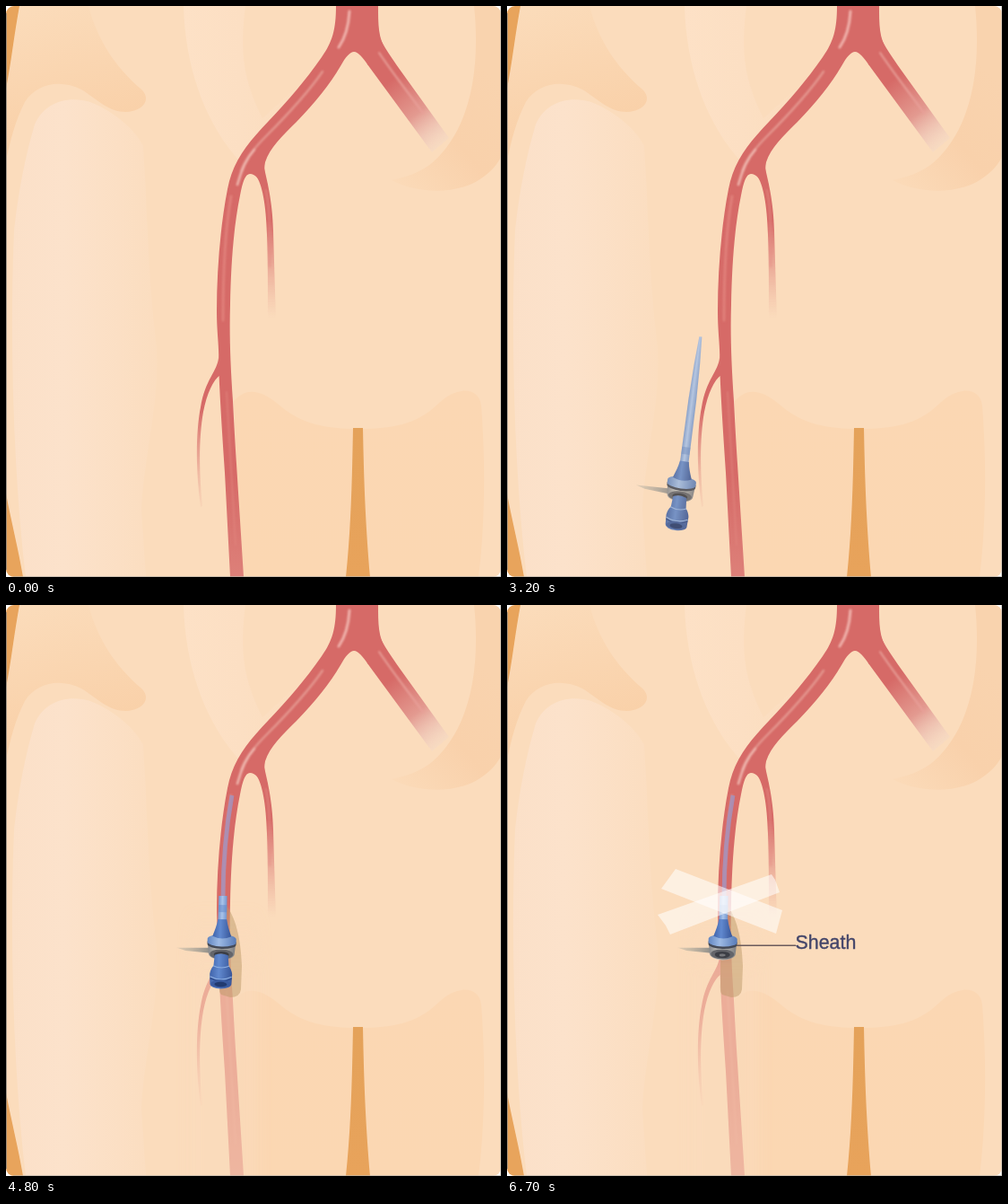
An HTML page that plays this animation: 552 by 636 pixels, repeating every 6.8 s.

```html
<!DOCTYPE html>
<html lang="en">
<head>
<meta charset="utf-8">
<title>Sheath insertion</title>
<style>
  html, body { margin: 0; width: 100%; height: 100%; overflow: hidden; background: #fff; }
  svg { display: block; width: 552px; height: 636px; }
  text { font: 21.4px "Liberation Sans", Arial, sans-serif; fill: #44466a; stroke: #44466a; stroke-width: .4; }
</style>
</head>
<body>
<svg viewBox="0 0 552 636" xmlns="http://www.w3.org/2000/svg">
  <defs>
    <clipPath id="card"><rect width="552" height="636" rx="9"/></clipPath>
    <clipPath id="outside"><rect y="324" width="552" height="312"/></clipPath>

    <linearGradient id="hip" x1="0" y1="0" x2=".25" y2="1">
      <stop offset="0" stop-color="#fbdcbb"/><stop offset="1" stop-color="#f9cfa6"/>
    </linearGradient>
    <linearGradient id="thigh">
      <stop offset="0" stop-color="#fbe0c8"/><stop offset=".35" stop-color="#fce2cb"/>
      <stop offset="1" stop-color="#fbddbf"/>
    </linearGradient>
    <linearGradient id="belly" gradientUnits="userSpaceOnUse" x1="198" y1="0" x2="340" y2="0">
      <stop offset="0" stop-color="#fde1c6"/><stop offset=".45" stop-color="#fcdfc3"/>
      <stop offset="1" stop-color="#fbdcbc"/>
    </linearGradient>
    <linearGradient id="flank" gradientUnits="userSpaceOnUse" x1="435" y1="195" x2="552" y2="90">
      <stop offset="0" stop-color="#fbdab8"/><stop offset=".5" stop-color="#f9d1ab"/>
      <stop offset="1" stop-color="#f9d3ae"/>
    </linearGradient>
    <linearGradient id="legs" x2="0" y2="1">
      <stop offset="0" stop-color="#fbd7b3"/><stop offset="1" stop-color="#fbd7b2"/>
    </linearGradient>
    <linearGradient id="gap" x2="0" y2="1">
      <stop offset="0" stop-color="#e4a25a"/><stop offset="1" stop-color="#e8a35b"/>
    </linearGradient>

    <linearGradient id="armFade" gradientUnits="userSpaceOnUse" x1="428" y1="84" x2="486" y2="158">
      <stop offset="0" stop-color="#d66a67"/><stop offset=".5" stop-color="#e39a90"/>
      <stop offset="1" stop-color="#f0dad0" stop-opacity=".25"/>
    </linearGradient>
    <linearGradient id="innerFade" gradientUnits="userSpaceOnUse" x1="0" y1="240" x2="0" y2="348">
      <stop offset="0" stop-color="#d66a67"/><stop offset="1" stop-color="#e59a8c" stop-opacity="0"/>
    </linearGradient>
    <linearGradient id="sideFade" gradientUnits="userSpaceOnUse" x1="0" y1="450" x2="0" y2="558">
      <stop offset="0" stop-color="#d66a67"/><stop offset="1" stop-color="#e59a8c" stop-opacity=".1"/>
    </linearGradient>
    <linearGradient id="trunk" x2="0" y2="1">
      <stop offset="0" stop-color="#d66a67"/><stop offset=".82" stop-color="#d66a67"/>
      <stop offset="1" stop-color="#dd8079"/>
    </linearGradient>
    <linearGradient id="veil" gradientUnits="userSpaceOnUse" x1="0" y1="338" x2="0" y2="405">
      <stop offset="0" stop-color="#fbdabb" stop-opacity="0"/><stop offset="1" stop-color="#fbdabb"/>
    </linearGradient>

    <linearGradient id="tube">
      <stop offset="0" stop-color="#7496cf"/><stop offset=".45" stop-color="#a9c3ea"/>
      <stop offset="1" stop-color="#7495cd"/>
    </linearGradient>
    <linearGradient id="blue">
      <stop offset="0" stop-color="#4063aa"/><stop offset=".4" stop-color="#6189cf"/>
      <stop offset="1" stop-color="#375598"/>
    </linearGradient>
    <linearGradient id="rim">
      <stop offset="0" stop-color="#6387c2"/><stop offset=".4" stop-color="#9dbae4"/>
      <stop offset="1" stop-color="#587bb8"/>
    </linearGradient>
    <linearGradient id="steel">
      <stop offset="0" stop-color="#85868a"/><stop offset=".4" stop-color="#c9c8c0"/>
      <stop offset="1" stop-color="#7c7d80"/>
    </linearGradient>
    <linearGradient id="pin">
      <stop offset="0" stop-color="#c4bba8" stop-opacity=".5"/><stop offset="1" stop-color="#8f8d88"/>
    </linearGradient>
    <filter id="soft" x="-30%" width="160%"><feGaussianBlur stdDeviation="7"/></filter>
    <filter id="haze"><feGaussianBlur stdDeviation=".9"/></filter>
    <filter id="blend"><feGaussianBlur stdDeviation=".6"/></filter>
  </defs>

  <g clip-path="url(#card)">
    <rect width="552" height="636" fill="#fbdcbc"/>

    <!-- body -->
    <path fill="url(#hip)" d="M14 0H92C102 38 122 68 150 92C163 103 154 117 134 118C114 118 102 104 84 93
      C62 82 35 85 21 107C10 128 5 150 0 172V90Z"/>
    <path fill="url(#thigh)" d="M9 250C14 205 22 165 32 132C42 108 68 99 94 107C122 118 146 140 153 156
      C158 230 158 300 168 380C172 440 154 500 151 560L156 636H22C8 520 4 370 9 250Z"/>
    <path fill="url(#belly)" d="M198 0C200 75 226 145 278 190L340 90V0Z"/>
    <path fill="#fbdcbc" d="M267 0C260 55 266 85 286 125L345 70V0Z"/>
    <path fill="url(#flank)" d="M522 0C530 80 514 140 476 174C462 186 444 191 430 194
      C460 210 505 210 530 192C542 184 548 176 552 168V0Z"/>
    <path fill="url(#legs)" d="M254 440C268 424 285 428 303 443C328 466 358 471 393 471C430 471 459 466 482 443
      C501 424 527 423 530 445C535 510 534 580 527 636H262Z"/>
    <path fill="url(#gap)" d="M387 470H398C399 520 400 565 406 636H379C385 580 386 520 387 470Z"/>
    <path fill="#e8a45c" d="M0 0H15C9 32 6 62 0 92ZM0 543C6 575 14 606 19 636H0Z"/>

    <!-- vessels -->
    <g filter="url(#blend)">
      <path fill="url(#armFade)" d="M413 24C417 40 427 53 440 72L494 147L475 163L403 65L396 48Z"/>
      <path fill="url(#innerFade)" d="M287 176C291 195 297 215 298 250C299 285 300 315 301 348H292
        C292 310 292 280 291 255C290 222 286 198 278 188Z"/>
      <path fill="url(#sideFade)" d="M237 392C236 406 222 416 217 447C212 472 211 515 217 558L219 557
        C215 520 215 480 220 452C224 432 231 416 239 411Z"/>
      <path fill="url(#trunk)" d="M368 0C368 26 364 40 352 57C334 83 314 106 293 128C267 155 253 174 247 204
        C239 245 235 295 235 340C235 365 238 380 237 395C238 430 241 475 244 520L250 636H265
        C261 570 256 500 253 440C250 395 249 365 250 332C251 285 254 245 261 211C264 195 267 187 272 187
        C278 187 284 194 288 204L292 200C289 192 287 184 289 174C294 158 308 145 324 129
        C344 108 361 88 373 67C379 56 384 51 388 51C393 51 398 58 404 66L424 50C415 36 415 20 415 0Z"/>
    </g>
    <g fill="none" stroke-linecap="round" filter="url(#haze)">
      <path stroke="#f0b4ad" stroke-width="3" d="M383 6C382 24 378 36 371 46"/>
      <path stroke="#e59a92" stroke-width="2.2" d="M353 73C335 99 308 127 290 145C275 160 266 172 262 184"/>
      <path stroke="#f0bbb2" stroke-width="2.5" d="M277 160C267 171 262 184 258 199"/>
      <path stroke="#e0807a" stroke-width="3" d="M251 212C244 250 242 300 242 350"/>
      <path stroke="#e8a099" stroke-width="2" d="M416 52C432 76 446 93 465 119"/>
      <path stroke="#e2857f" stroke-width="2" opacity=".6" d="M246 430L256 600"/>
      <path stroke="#e58d86" stroke-width="2" opacity=".6" d="M290 205C294 225 294 250 294 290"/>
    </g>

    <path id="cover" filter="url(#soft)" fill="url(#veil)" d="M205 330H282V660H205Z"/>
    <path id="shadow" fill="#bd9a68" d="M245 334C256 347 262 372 263 402L262 428Q261 437 250 437L240 434
      Q237 432 238 420V375Z"/>
    <path id="inside" pathLength="1" fill="none" stroke="#9f95c3" stroke-width="4.8"
      d="M242 326C242 288 246 245 252 212"/>

    <!-- sheath and dilator -->
    <g id="device" filter="url(#blend)">
      <g clip-path="url(#outside)"><g class="pose">
        <path fill="url(#tube)" d="M-1.5 -170H1.5L3.2 -140L4.4 -100L4.8 -26H-4.8L-4.4 -100L-3.2 -140Z"/>
        <path fill="#5f86c8" opacity=".5" d="M-4.6 -46H4.6V-38H-4.6Z"/>
      </g></g>
      <g class="pose">
        <path fill="url(#pin)" d="M-50 3L-12 2V8L-40 6Z"/>
        <path fill="url(#steel)" d="M-15.5 -3H15.5L14.5 8A14.5 7.5 0 0 1 -14.5 8Z"/>
        <ellipse cy="9" rx="13" ry="5.5" fill="#64656a"/>
        <ellipse cy="9.5" rx="8.5" ry="3.6" fill="#3c3e45"/>
        <ellipse cy="10" rx="3.5" ry="1.5" fill="#75767a"/>
        <path fill="#454a56" d="M-16 -5H16V-2A16 5 0 0 1 -16 -2Z"/>
        <path fill="url(#rim)" d="M-16 -8A16 5 0 0 1 16 -8V-4.5A16 5 0 0 1 -16 -4.5Z"/>
        <path fill="url(#blue)" d="M-5 -30H5C6 -23 8 -18 10.5 -11Q0 -6 -10.5 -11C-8 -18 -6 -23 -5 -30Z"/>
      </g>
      <g class="pose"><g id="cap">
        <path fill="url(#blue)" d="M-7.5 10Q0 7 7.5 10L8.5 22Q11.5 25 12.5 31L12 42A12 5.5 0 0 1 -12 42
          L-12.5 31Q-11.5 25 -8.5 22Z"/>
        <path fill="none" stroke="#8fb0e2" stroke-width="1.1" d="M-9 22Q0 26 9 22M-12 34Q0 40 12 34"/>
        <path fill="none" stroke="#2f4c8c" stroke-width="1.3" d="M-12 36Q0 42 12 36"/>
        <ellipse cy="42" rx="11" ry="4.6" fill="#3a5a9f"/>
        <ellipse cy="42.5" rx="7" ry="2.8" fill="#223a70"/>
      </g></g>
    </g>

    <g id="tape" fill="#fff" fill-opacity=".56">
      <path d="M188 294L307 340L300 366L172 316Z"/>
      <path d="M168 345L295 300L299 306L304 320L182 367L177 357Z"/>
    </g>
    <g id="label">
      <path stroke="#6b5b5c" stroke-width="1.4" d="M256 379.3H322"/>
      <text x="321.5" y="382.5">Sheath</text>
    </g>
  </g>
  <path fill="none" stroke="#8c8780" d="M.5 8V628" opacity=".8"/>
  <path fill="none" stroke="#b9b2a8" d="M551.5 0V636M8 635.5H552" opacity=".7"/>
</svg>
<script>
  const LOOP = 6800, STEP = 100;

  // time, hub x, hub y, angle, opacity
  const path = [
    [2000, 117, 559, 23, 0],
    [2600, 155, 550, 15.2, .5],
    [3200, 194, 537, 7.4, .88],
    [3500, 216, 524, 3.2, 1],
    [4000, 252.5, 495, -4.3, 1],
    [4700, 240.5, 380, 1.5, 1]
  ];

  const $ = id => document.getElementById(id);
  const poses = document.querySelectorAll('.pose');
  const ramp = (t, a, b) => Math.min(1, Math.max(0, (t - a) / (b - a)));

  function sample(keys, t) {
    const i = keys.findIndex(k => k[0] > t);
    if (i === 0) return keys[0].slice(1);
    if (i < 0) return keys[keys.length - 1].slice(1);
    const a = keys[i - 1], b = keys[i], p = ramp(t, a[0], b[0]);
    return a.slice(1).map((v, j) => v + (b[j + 1] - v) * p);
  }

  // Fading parts lose colour along with opacity.
  function fade(id, alpha) {
    $(id).style.opacity = alpha;
    $(id).style.filter = alpha < 1 ? `saturate(${alpha})` : '';
  }

  function draw(t) {
    const [x, y, angle, alpha] = sample(path, t);
    for (const p of poses) p.setAttribute('transform', `translate(${x} ${y}) rotate(${angle})`);
    fade('device', alpha);

    const depth = ramp(t, 4000, 4700);
    $('inside').style.strokeDasharray = `${depth} 2`;
    $('inside').style.opacity = depth > 0 ? .78 : 0;
    $('cover').style.opacity = depth * .6;
    $('shadow').style.opacity = depth * .5;

    $('tape').style.opacity = ramp(t, 4900, 5300);
    $('label').style.opacity = ramp(t, 5400, 6000);

    $('cap').setAttribute('transform', `translate(0 ${ramp(t, 5500, 6300) * 56})`);
    fade('cap', 1 - ramp(t, 5700, 6400));
  }

  const start = performance.now();
  function tick() {
    const t = (performance.now() - start) % LOOP;
    draw(Math.floor(t / STEP) * STEP);
    requestAnimationFrame(tick);
  }
  tick();
</script>
</body>
</html>
```
